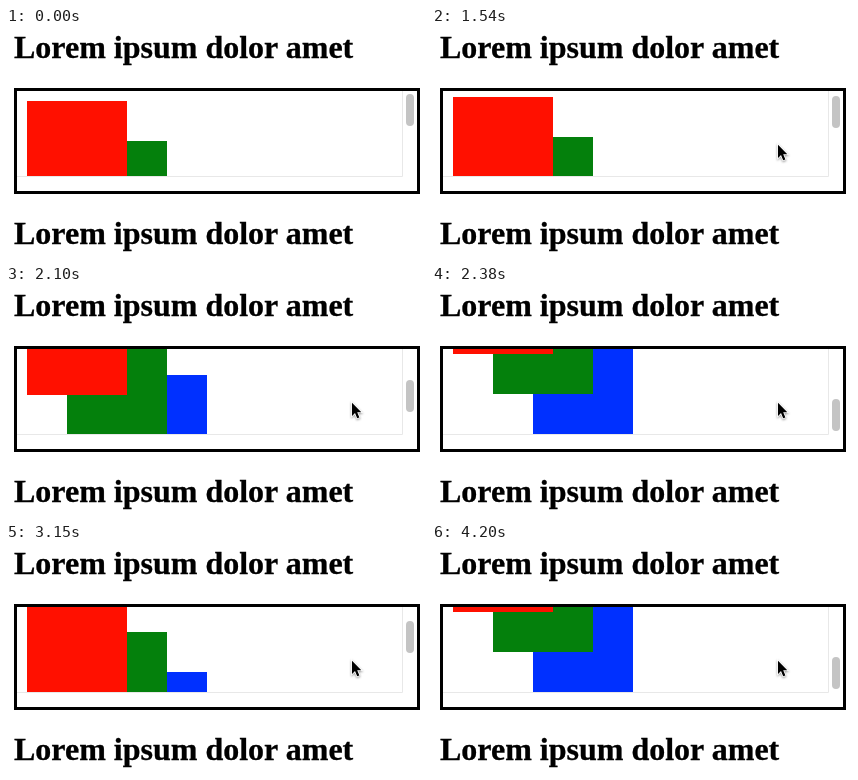
Write an HTML page that moves like this. It is 420 px wide and 230 px high and loops after 4.48 s.

```html
<!DOCTYPE html>
<html lang="en">
<head>
<meta charset="utf-8">
<title>Scroll snapping</title>
<style>
  html, body { margin: 0; width: 100%; height: 100%; overflow: hidden; background: #fff; }
  svg { display: block; }
  text { font: bold 32px "Liberation Serif", "Times New Roman", serif; stroke: #000; stroke-width: .3px; }
  #cursor { stroke: #fff; stroke-width: 1.6px; paint-order: stroke; filter: drop-shadow(0 1px 1px #0006); }
</style>
</head>
<body>
<svg width="420" height="230" viewBox="0 0 420 230">
  <clipPath id="viewport"><rect x="11" y="63" width="385" height="85"/></clipPath>

  <text x="8" y="30">Lorem ipsum dolor amet</text>
  <text x="8" y="216">Lorem ipsum dolor amet</text>

  <g clip-path="url(#viewport)">
    <g id="content">
      <rect x="101" y="153" width="100" height="100" fill="#0030ff"/>
      <rect x="61" y="113" width="100" height="100" fill="#04800c"/>
      <rect x="21" y="73" width="100" height="100" fill="#ff1000"/>
    </g>
  </g>

  <path d="M11 148.5H396.5V63" fill="none" stroke="#e8e8e8"/>
  <rect id="thumb" x="400" y="66" width="8" height="32" rx="4" fill="#c4c4c4"/>
  <rect x="9.5" y="61.5" width="403" height="103" fill="none" stroke="#000" stroke-width="3"/>

  <path id="cursor" d="M0 0V13.2L3 10.4L5.2 15.6L7.4 14.7L5.2 9.6H9.3Z"/>
</svg>
<script>
  const LOOP = 4480, FRAME = 70, SCROLL_TIME = 70;
  const MAX_SCROLL = 105, THUMB_TRAVEL = 47;
  const CURSOR_ENTRY = 420, CURSOR_DECAY = 25;

  // Scroll gestures: when each starts and the offset it eases to
  const gestures = [
    { start: 1536, to: 25 }, { start: 2050, to: 65 }, { start: 2310, to: MAX_SCROLL },
    { start: 2610, to: 65 }, { start: 2870, to: 4 }, { start: 2940, to: 25 },
    { start: 3450, to: 0 }, { start: 3990, to: MAX_SCROLL }
  ];

  const [content, thumb, cursor] = ["content", "thumb", "cursor"].map(id => document.getElementById(id));
  const clamp = value => Math.min(1, Math.max(0, value));
  const easeOut = progress => 1 - (1 - progress) ** 3;
  const move = (element, x, y) => element.setAttribute("transform", `translate(${x} ${y})`);

  const scrollAt = time => Math.round(gestures.reduce(
    (scroll, { start, to }) => scroll + (to - scroll) * easeOut(clamp((time - start) / SCROLL_TIME)), 0));

  function draw() {
    const time = Math.floor(performance.now() % LOOP / FRAME) * FRAME;
    const scroll = scrollAt(time);
    move(content, 0, -scroll);
    move(thumb, 0, Math.round(scroll / MAX_SCROLL * THUMB_TRAVEL - 0.2));

    const remaining = Math.exp((CURSOR_ENTRY - time) / CURSOR_DECAY);
    cursor.style.display = time < CURSOR_ENTRY ? "none" : "";
    move(cursor, 346 + 25 * remaining, 116.7 + 69 * remaining);
    requestAnimationFrame(draw);
  }
  draw();
</script>
</body>
</html>
```
